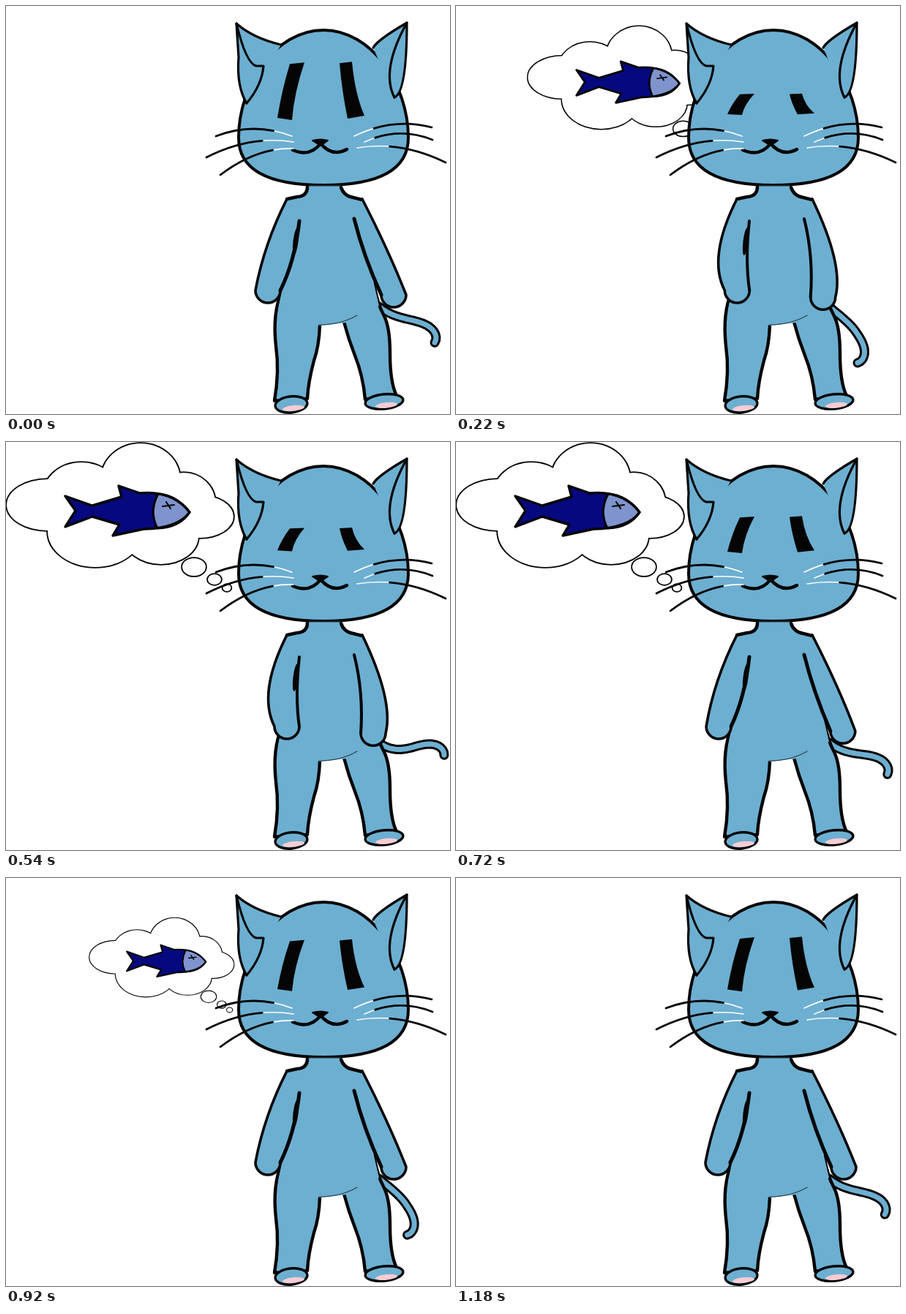
Write an HTML page with a canvas that moves like this. It is 607 px wide and 558 px high and loops after 1.2 s.

```html
<!DOCTYPE html>
<html lang="en">
<head>
<meta charset="utf-8">
<title>Hungry cat</title>
<style>
  html, body { margin: 0; width: 100%; height: 100%; overflow: hidden; background: #fff; }
  canvas { display: block; }
</style>
</head>
<body>
<canvas id="stage" width="607" height="558"></canvas>
<script>
const ctx = document.getElementById('stage').getContext('2d');
const LOOP = 1200;
const { PI, sin, cos, min, max } = Math;
const BLUE = '#6dafd1', INK = '#050505', PINK = '#f8cdd3';

const path = d => new Path2D(d);
const mix = (a, b, k) => a.map((v, i) => v + (b[i] - v) * k);

function ellipse(x, y, rx, ry, tilt = 0) {
  const p = new Path2D();
  p.ellipse(x, y, rx, ry, tilt, 0, 2 * PI);
  return p;
}

function fill(p, color = BLUE) {
  ctx.fillStyle = color;
  ctx.fill(p);
}

function stroke(p, width, color = INK) {
  ctx.lineWidth = width;
  ctx.strokeStyle = color;
  ctx.stroke(p);
}

// Draw in a space scaled about (x, y)
function scaled(x, y, sx, sy, paint) {
  ctx.save();
  ctx.translate(x, y);
  ctx.scale(sx, sy);
  ctx.translate(-x, -y);
  paint();
  ctx.restore();
}

// Thought bubble: overlapping lobes, outlined first and then filled
const puffs = [
  [57, 86, 56, 35], [103, 72, 52, 44], [184, 51, 54, 49], [243, 83, 43, 41],
  [265, 102, 46, 29], [212, 129, 51, 38], [122, 122, 65, 49],
  [257, 171, 16, 12], [285, 188, 9, 7], [302, 199.5, 5.5, 4.5]
].map(p => ellipse(...p));
const fish = path(`M81 74L118 87L158 75L154 60L183 70Q228 66 251 96Q236 118 188 119
  L146 128L155 113L118 102L81 116L95 94Z`);
const fishHead = path('M208 71Q234 73 251 96Q238 117 207 118Q195 95 208 71Z');
const fishEye = path('M214 88L230 86M219 82L225 91');

function drawThought() {
  puffs.forEach(p => stroke(p, 3.6));
  puffs.forEach(p => fill(p, '#fff'));
  fill(fish, '#06087f');
  fill(fishHead, '#7f93cd');
  stroke(fish, 3.4);
  stroke(fishHead, 3);
  stroke(fishEye, 2.2);
}

// Tail: a chain of short steps whose heading curls and swings
function drawTail(swing) {
  const steps = 25, length = 100;
  const p = new Path2D();
  let x = 510, y = 411;
  p.moveTo(x, y);
  for (let i = 0; i < steps; i++) {
    const s = (i + 0.5) / steps;
    const heading = 40 - 28 * sin(PI * s) + 85 * s ** 6 + swing * min(1, 2 * s);
    x += length / steps * cos(heading * PI / 180);
    y += length / steps * sin(heading * PI / 180);
    p.lineTo(x, y);
  }
  stroke(p, 13);
  stroke(p, 7, BLUE);
}

// Head: one half, mirrored
const HEAD_X = 434;
const halfHead = path(`M${HEAD_X} 33C368 33 318 108 318 180C318 228 366 245 ${HEAD_X} 245`);
const head = new Path2D(halfHead);
head.addPath(halfHead, new DOMMatrix([-1, 0, 0, 1, 2 * HEAD_X, 0]));
const ears = path('M329 133Q315 110 318 70L315 24Q338 44 376 53M502 57Q508 46 548 23Q548 118 531 125');
const earFolds = path('M315 24Q328 78 342 82H352Q350 108 329 133M548 23Q512 88 531 125');
const eyes = path(`M388 79Q377 115 371 153L391 156Q394 118 408 77Z
  M456 78L473 76Q477 120 490 150L467 154Q459 115 456 78Z`);
const nose = path('M419 184Q430 181 440 184L430 191Z');
const mouth = path('M392 197Q416 207 430 188Q446 207 466 196');
const whiskers = [
  [287, 178, 391, 178], [274, 207, 393, 186], [293, 231, 393, 195],
  [582, 166, 476, 178], [583, 183, 490, 186], [601, 214, 480, 194]
].map(([x0, y0, x1, y1]) => path(`M${x0} ${y0}Q${(x0 + x1) / 2} ${(y0 + y1) / 2 - 20} ${x1} ${y1}`));

function drawHead(eyeOpen) {
  fill(head);
  stroke(head, 4);
  fill(ears);
  fill(earFolds);
  stroke(ears, 3.2);
  stroke(earFolds, 3.2);
  scaled(0, 145, 1, eyeOpen, () => fill(eyes, INK));
  fill(nose, INK);
  stroke(nose, 2);
  stroke(mouth, 4.5);
  for (const w of whiskers) {
    stroke(w, 1.6, '#fff');
    ctx.setLineDash([80, 999]);
    stroke(w, 2.8);
    ctx.setLineDash([]);
  }
}

// Body
const torso = path(`M413 246Q412 262 384 264L392 340L377 390L372 415L429 437L465 433L510 410
  L503 380L494 320L487 264Q462 262 459 246Z`);
const legs = path(`M377 390Q364 420 369 465Q374 500 367 540L412 537Q413 515 421 485Q428 465 429 437
  M503 380Q508 408 517 424Q525 440 525 475Q525 515 534 533L491 538Q488 505 477 478Q468 455 462 432`);
const neck = path('M412 247Q412 260 398 261L384 264M458 248Q462 260 475 262L487 265');
const creases = path('M414 246H457M428 436Q458 436 480 423');
const feet = [[390, 545, 22, 11], [517, 541, 26, 10]];

function drawBody() {
  fill(legs);
  stroke(legs, 4.4);
  fill(torso);
  stroke(neck, 4.5);
  stroke(creases, 1.2, '#2c444f');
  for (const [x, y, rx, ry] of feet) {
    const foot = ellipse(x, y, rx, ry, -0.1);
    fill(foot);
    stroke(foot, 3.4);
    fill(ellipse(x + 3, y + 5, 15, 3.8, -0.1), PINK);
  }
}

// Arms: elbow and hand move from [hanging] to [folded]
const HAND = 17;
const leftArm = {
  side: -1, shoulder: [384, 264], armpit: [401, 294], bend: [395, 349],
  elbow: [[353, 325], [339, 353]], hand: [[358, 389], [398, 389]]
};
const rightArm = {
  side: 1, shoulder: [487, 264], armpit: [476, 291], bend: [489, 343],
  elbow: [[523, 334], [534, 364]], hand: [[530, 395], [487, 400]]
};

function drawArm({ side, shoulder, armpit, bend, elbow, hand }, fold) {
  const [hx, hy] = mix(...hand, fold);
  const outer = new Path2D(), inner = new Path2D();
  outer.moveTo(...shoulder);
  outer.quadraticCurveTo(...mix(...elbow, fold), hx + side * HAND, hy);
  outer.arc(hx, hy, HAND, side < 0 ? PI : 0, side < 0 ? 0 : PI, side < 0);
  inner.moveTo(hx - side * HAND, hy);
  inner.quadraticCurveTo(...bend, ...armpit);
  const whole = new Path2D(outer);
  whole.quadraticCurveTo(...bend, ...armpit);
  fill(whole);
  stroke(outer, 3.6);
  stroke(inner, 5 - 1.5 * fold);
}

function draw(t) {
  const eyeOpen = t < 380 ? 1 - 0.8 * sin(PI / 2 * t / 380) : min(0.94, 0.2 + 0.8 * (t - 380) / 630);
  const fold = t < 760 ? 1.05 * sin(PI * t / 760) ** 2 : 0;
  const wag = t < 740 ? sin(2 * PI * t / 740) : max(0, sin(PI * (t - 740) / 440));

  ctx.fillStyle = '#fff';
  ctx.fillRect(0, 0, 607, 558);
  ctx.lineCap = ctx.lineJoin = 'round';

  // The bubble grows out from behind the head, then shrinks beside it
  const grown = min(1, 0.35 + 0.65 * t / 300), left = (1080 - t) / 250;
  if (left >= 1) scaled(570, 153, grown, grown, drawThought);
  else if (left > 0) scaled(312, 147, left, left, drawThought);

  drawTail(wag * (37 + 7 * wag));
  drawHead(eyeOpen);
  drawBody();
  drawArm(leftArm, fold);
  drawArm(rightArm, fold);
  fill(ellipse(396, 322, 3.5, 19, 0.12), INK);
}

function tick() {
  draw(performance.now() % LOOP);
  requestAnimationFrame(tick);
}
tick();
</script>
</body>
</html>
```
